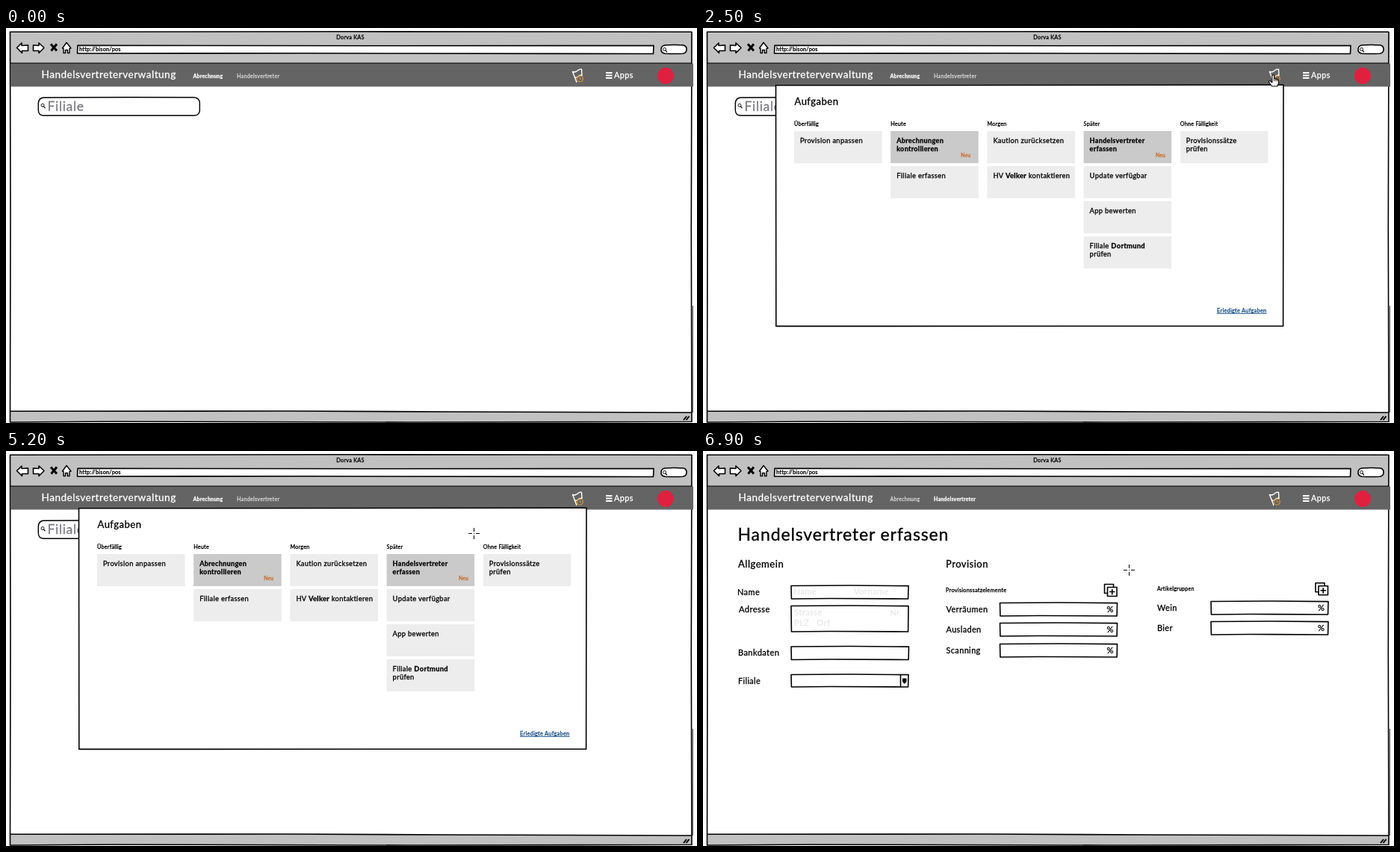
An HTML page for the animation above (8 s loop, 925 px wide and 529 px high).

```html
<!DOCTYPE html>
<html lang="de">
<head>
<meta charset="utf-8">
<title>Handelsvertreterverwaltung</title>
<style>
  html, body { margin: 0; width: 100%; height: 100%; overflow: hidden; background: #fff; }
  svg { display: block; width: 100%; height: 100%; }
  text { font-family: Lato, "Open Sans", sans-serif; letter-spacing: .037em; stroke-width: .3; white-space: pre; }
  .ink { fill: #fff; stroke: #000; stroke-width: 1.6; stroke-linejoin: round; stroke-linecap: round; }
  .bar { fill: #c1c1c1; stroke: none; }
  .line { fill: none; stroke: #000; stroke-width: 1.6; }
  #cross { mix-blend-mode: difference; stroke: #fff; stroke-width: 1; fill: none; }
</style>
</head>
<body>
<svg id="stage" viewBox="0 0 925 529"></svg>
<script>
const LOOP = 8000, STEP = 100;
const OPEN = 2500, FORM = 6900;
const TYPE = .93; // small letters, widely spaced

const text = (x, y, s, size, fill = '#000', extra = '') =>
  `<text x="${x}" y="${y}" font-size="${size * TYPE}" fill="${fill}" stroke="${fill}" ${extra}>${s}</text>`;
const bold = (x, y, s, size, fill = '#000') => text(x, y, s, size, fill, 'font-weight="700"');
const path = (d, cls = 'ink', extra = '') => `<path class="${cls}" d="${d}" ${extra}/>`;
const rect = (x, y, w, h, fill) => `<rect x="${x}" y="${y}" width="${w}" height="${h}" fill="${fill}"/>`;
const group = (id, body) => `<g id="${id}">${body}</g>`;

// Box with slightly uneven, hand-drawn edges
const box = (x, y, w, h) =>
  path(`M${x} ${y + .5}L${x + w / 2} ${y}L${x + w} ${y + .6}L${x + w - .4} ${y + h}L${x + w / 3} ${y + h - .5}L${x + .4} ${y + h}Z`);

const lens = (x, y, r) =>
  `<g fill="none" stroke="#000" stroke-width=".9"><circle cx="${x}" cy="${y}" r="${r}"/>
   <path d="M${x + r * .7} ${y + r * .7}l${r} ${r * 1.2}" stroke-width="1.2"/></g>`;

function browser() {
  return rect(0, 0, 925, 529, '#fff') +
    path('M6 5H918V47H6Z', 'bar') +
    path('M6 513.3L380 513L600 514L918 515V528H6Z', 'bar') +
    path('M6 513.3L380 513L600 514L918 515M5 528L140 527L540 528L918 527.3M5 5.2L460 4.8L918 5.2M5.5 5L6 250L5.5 528M918 5L917.3 270L918 528', 'line') +
    path('M919.3 372V515', 'line', 'style="stroke-width:.8"') +
    text(461, 15, 'Dorva KAS', 7.8, '#000', 'text-anchor="middle"') +
    path('M14.5 26.5L21 20V23.5L29.5 23V30.5L21.5 30.5V33.5Z') +
    path('M51 26.5L44 20V23.5L36.5 23V30.5L44 30.5V33.5Z') +
    path('M60 21.5L68 30.5M68 21.5L60.5 30.5', 'line', 'style="stroke-width:3"') +
    path('M75.5 27L81 19.5L87 27L85 27.5V33.5H82.5V29.5H79.5V33.5H77V27.5Z', 'ink', 'style="stroke-width:1.4"') +
    path('M96 23.4L480 23.8L867 23.6L866.5 34.5L400 33.8L95.5 34Z') +
    text(98, 31, 'http://bison/pos', 7.8) +
    path('M882 23Q894 22 907 23Q911.5 24.5 911 29Q911 33.5 906 34.3Q894 34.7 882 34.3Q876.5 33 877 28.5Q877 24 882 23Z') +
    lens(881.5, 28.5, 2) +
    path('M907 525l4-5M910.5 525l4-5', 'line', 'style="stroke-width:2"');
}

function header() {
  return rect(6, 47.5, 914, 31, '#646464') + path('M6 47.2H918', 'line', 'style="stroke-width:1.2"') +
    text(47.5, 67, 'Handelsvertreterverwaltung', 14.6, '#fff') +
    group('navList', bold(250.5, 67, 'Abrechnung', 7.4, '#fff') + text(309, 67, 'Handelsvertreter', 7.7, '#d4d4d4')) +
    group('navForm', text(250.5, 67, 'Abrechnung', 7.5, '#d4d4d4') + bold(309, 67, 'Handelsvertreter', 7.4, '#fff')) +
    `<g fill="none" stroke="#fff" stroke-width="1.4" stroke-linejoin="round">
       <path d="M764 73L758.5 58.5Q762 60 765.5 56.8Q768 54.5 770.5 55.5L771 63.5Q768 62.5 766 65Q763.5 67 761.5 66"/>
       <path d="M803 60H811.5M803 63.5H811.5M803 67H811.5" stroke-width="2"/>
       <circle cx="768.3" cy="68" r="4" stroke="#e0962e" stroke-width="1.2"/>
       <path d="M768.3 66V68.5H770" stroke="#e0962e" stroke-width="1"/>
     </g>` +
    text(814, 67, 'Apps', 11.7, '#fff') +
    '<circle cx="883" cy="64" r="11" fill="#e0203f"/>' +
    '<rect id="flagHover" x="756.5" y="54.5" width="17" height="18" fill="none" stroke="#a8a8a8"/>';
}

function search() {
  return path('M50 93.2Q150 92.4 252 93Q259.5 94 259.3 101V110Q259 117 252 117.2H50Q43.5 117 43.3 110V101Q43.5 94 50 93.2Z', 'ink', 'style="stroke-width:1.4"') +
    lens(49, 103.5, 2) + text(55.5, 111, 'Filiale', 18.9, '#7c7a80');
}

// A leading "!" marks a new task, "|" breaks the line
const columns = [
  ['Überfällig', ['Provision anpassen']],
  ['Heute', ['!Abrechnungen|kontrollieren', 'Filiale erfassen']],
  ['Morgen', ['Kaution zurücksetzen', 'HV <tspan font-weight="700">Velker</tspan> kontaktieren']],
  ['Später', ['!Handelsvertreter|erfassen', 'Update verfügbar', 'App bewerten', 'Filiale <tspan font-weight="700">Dortmund</tspan>|prüfen']],
  ['Ohne Fälligkeit', ['Provisionssätze|prüfen']]
];

function card(x, y, label) {
  const isNew = label[0] === '!';
  const lines = label.replace('!', '').split('|');
  return rect(x, y, 117.5, 43, isNew ? '#cacaca' : '#ededed') +
    lines.map((s, i) => (isNew ? bold : text)(x + 8, y + 16 + i * 11, s, isNew ? 9.75 : 10)).join('') +
    (isNew ? text(x + (x > 400 ? 96.5 : 94), y + 35, 'Neu', 7.2, '#c86a28') : '');
}

function tasks() {
  return path('M97.5 76.8L777 76.3L776.6 399.2L97.8 399.4Z') +
    text(122.5, 103, 'Aufgaben', 14) +
    columns.map(([name, cards], c) => {
      const x = 122 + c * 129.2;
      return text(x, 131, name, 7.7) + cards.map((s, r) => card(x, 138 + r * 47, s)).join('');
    }).join('') +
    text(688, 381, 'Erledigte Aufgaben', 7.95, '#174f86', 'text-decoration="underline"') +
    '<rect id="cardHover" x="510" y="138.5" width="117" height="42" fill="none" stroke="#000"/>';
}

const plus = (x, y) => path(`M${x} ${y}h12v12h-12Z`) + path(`M${x + 4} ${y + 4}h12.5v12h-12.5Z`) +
  path(`M${x + 6.5} ${y + 10}h7.5M${x + 10.2} ${y + 6.5}v7.5`, 'line');
const percent = (x, y, name) => text(x - 72, y + 13, name, 11.7) + box(x, y, 157, 18) + text(x + 143, y + 13, '%', 12);

function form() {
  const pale = '#e8e8e8';
  return text(46.5, 120, 'Handelsvertreter erfassen', 24.8) +
    text(47, 156, 'Allgemein', 14.1) + text(325, 156, 'Provision', 14) +
    text(46, 193, 'Name', 11.8) + text(48, 216, 'Adresse', 12) +
    text(47, 274, 'Bankdaten', 11.9) + text(47, 312, 'Filiale', 11.6) +
    box(118, 180, 157, 18) + box(118, 207, 157, 35) + box(118, 261.5, 157.5, 18) + box(118, 299, 157, 17) +
    text(121.5, 192, 'Name', 12, pale) + text(202, 192, 'Vorname', 12, pale) +
    text(122, 220, 'Strasse', 12, pale) + text(251, 220, 'Nr.', 11, pale) + text(122, 234, 'PLZ   Ort', 12, pale) +
    path('M264.5 299.5V316', 'line') + path('M267 304.5H272.5V309L269.8 312L267 309Z', '', 'fill="#000"') +
    text(325, 189, 'Provisionssatzelemente', 7.9) + text(608, 187, 'Artikelgruppen', 7.6) +
    plus(537.5, 178.5) + plus(820, 176.8) +
    percent(397.5, 203, 'Verräumen') + percent(397.5, 230, 'Ausladen') + percent(397.5, 258, 'Scanning') +
    percent(680, 201, 'Wein') + percent(680, 228, 'Bier');
}

function pointer() {
  return group('cross', path('M-7.5 0H-2.5M-.5 0H.5M2.5 0H7.5M0 -7.5V-2.5M0 2.5V7.5', '')) +
    group('hand',
      path('M-1.6 1Q-.2 -.6 1.1 1V5.3Q2.6 4.6 3.3 5.9Q4.7 5.2 5.4 6.6Q7 6.2 7 7.8V11L5.5 15.5H-2L-6 9.8Q-6.3 8 -4.6 8.2L-1.6 10.5Z', 'ink', 'style="stroke-width:1.1"') +
      path('M1.1 5.3V8.5M3.3 6V8.8M5.4 6.7V9', 'line', 'style="stroke-width:.9"'));
}

stage.innerHTML = browser() + header() + group('list', search() + group('popup', tasks())) +
  group('entry', form()) + pointer();

const $ = id => document.getElementById(id);
const show = (id, on) => $(id).setAttribute('display', on ? 'inline' : 'none');

// Pointer moves: start, end, then from / control / to points
const moves = [
  [300, 1100, [692.5, 233.5], [1028, 150], [776.5, 83.5]],
  [1100, 1800, [776.5, 83.5], [770, 73], [763.5, 62.5]],
  [4400, 5200, [757, 62.5], [692, 86], [626.5, 110.5]],
  [5200, 5900, [626.5, 110.5], [598, 135], [570.5, 159.5]]
];

function pointerAt(t) {
  const [from, to, a, b, c] = moves.filter(m => t >= m[0]).pop() || moves[0];
  const k = Math.max(0, Math.min(1, (t - from) / (to - from)));
  const u = k * (2 - k), v = 1 - u;
  return a.map((p, i) => Math.round(v * v * p + 2 * u * v * b[i] + u * u * c[i] - .5) + .5);
}

function draw(time) {
  const t = Math.floor((time % LOOP) / STEP) * STEP;
  const [x, y] = pointerAt(t);
  const isForm = t >= FORM, isOpen = t >= OPEN && !isForm;
  const onFlag = x >= 756 && x <= 774 && y >= 54 && y <= 74;
  const onCard = isOpen && x >= 510 && x <= 627 && y >= 138 && y <= 181;
  const isHand = !isForm && (onFlag || onCard);

  show('list', !isForm);
  show('popup', isOpen);
  show('entry', isForm);
  show('navList', !isForm);
  show('navForm', isForm);
  show('flagHover', t >= 2400 && t < OPEN);
  show('cardHover', t >= 6700 && !isForm);
  show('cross', t >= 300 && !isHand);
  show('hand', t >= 300 && isHand);
  for (const id of ['cross', 'hand']) $(id).setAttribute('transform', `translate(${x} ${y})`);
}

const start = performance.now();
function tick() {
  draw(performance.now() - start);
  requestAnimationFrame(tick);
}
tick();
</script>
</body>
</html>
```
